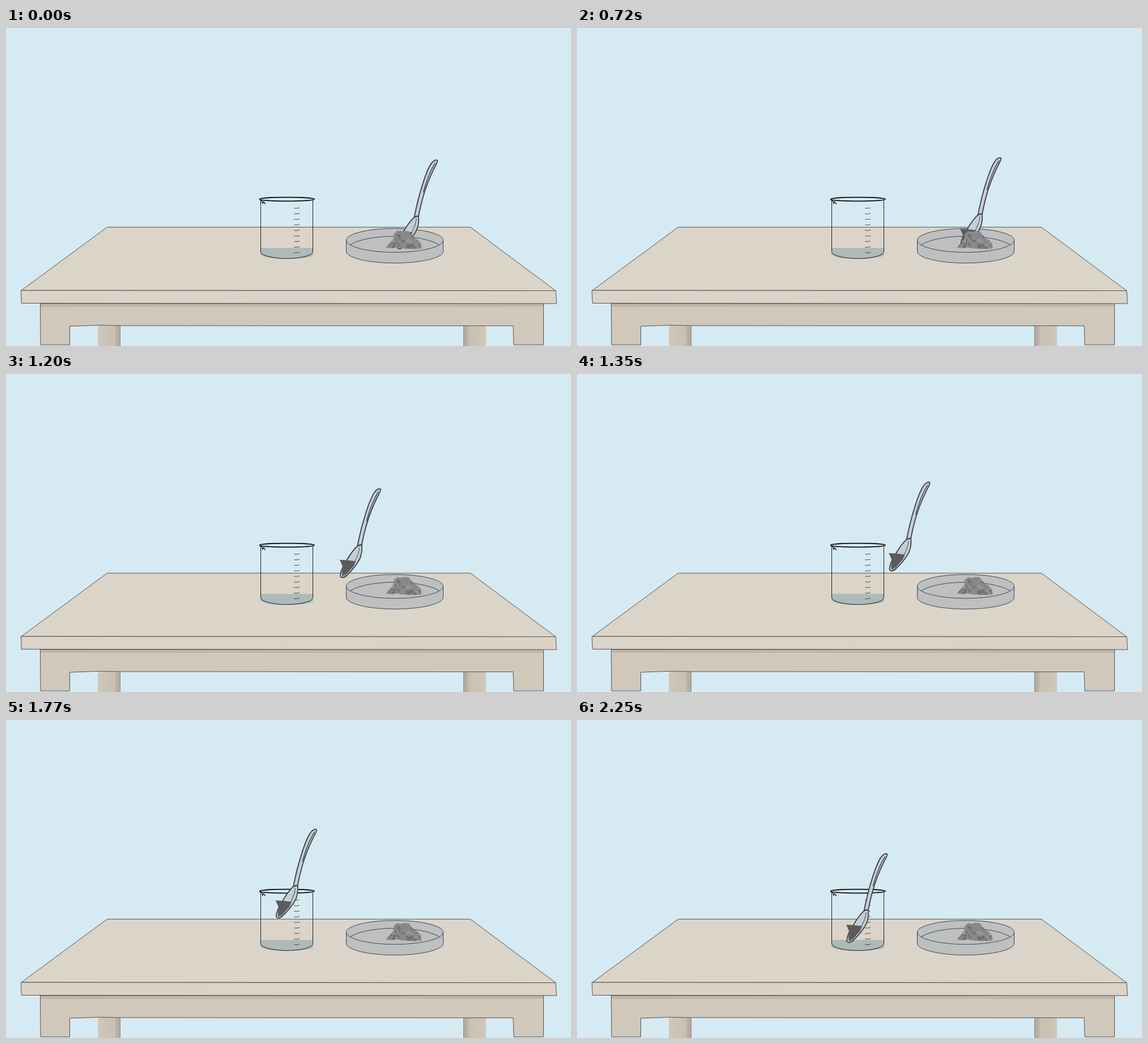
An HTML page with a canvas that plays this animation: 997x561 px, repeating every 2.73 s.

```html
<!DOCTYPE html>
<html lang="en">
<head>
<meta charset="utf-8">
<title>Spoon and beaker</title>
<style>
html, body { margin: 0; width: 100%; height: 100%; overflow: hidden; background: #d6eaf3; }
canvas { display: block; }
</style>
</head>
<body>
<canvas id="stage" width="997" height="561"></canvas>
<script>
const ctx = document.getElementById('stage').getContext('2d');
const LOOP = 2730, HOLD = 480, STEP = 30, STEPS = 60;

function paint(path, fill, stroke, width = 1) {
  if (fill) {
    ctx.fillStyle = fill;
    ctx.fill(path);
  }
  if (stroke) {
    ctx.strokeStyle = stroke;
    ctx.lineWidth = width;
    ctx.stroke(path);
  }
}

function shape(d, fill, stroke, width) {
  paint(new Path2D(d), fill, stroke, width);
}

function rect(x, y, w, h, fill) {
  ctx.fillStyle = fill;
  ctx.fillRect(x, y, w, h);
}

function randomFrom(seed) {
  return () => (seed = (seed * 16807) % 2147483647) / 2147483647;
}

function drawLeg(x, mirrored) {
  const g = ctx.createLinearGradient(x, 0, x + 40, 0);
  const tones = ['#d1c8bb', '#cec5b9', '#c9c0b4', '#bab0a5', '#b3a99f'];
  [0, 0.15, 0.74, 0.82, 1].forEach((p, i) =>
    g.addColorStop(mirrored ? 1 - p : p, tones[i]));
  rect(x, 524, 40, 37, g);
  rect(mirrored ? x : x + 39, 524, 1, 37, '#8d867e');
}

function drawTable() {
  const line = '#56524e';
  drawLeg(162, false);
  drawLeg(807, true);
  const apron = 'M60.5 486H948.5V559H896L895 525.4L202 525L163 524.3L112.5 526.2V559H61Z';
  shape(apron, '#d1c8bc');
  rect(61, 486, 887, 6, '#c0b6ab');
  shape(apron, null, line);
  shape('M178.5 351.3H819.5L970 463.5L27 462.9Z', '#dbd4c8', line);
  shape('M26.4 462.9L970 463.5L971.5 486.2L27.3 485.5Z', '#dbd3c8', line);
}

function drawBeaker() {
  shape('M449 388H541.5V402L535 404Q520 407 495 407Q466 407 453 402.5L449 400Z', '#aeb9b9');
  shape('M449.5 305V394.5A46 12.2 0 0 0 541.5 394.5V304', null, '#1c1c1c', 1);
  const rim = new Path2D();
  rim.ellipse(495.8, 302, 48.4, 3.4, 0, 0, 7);
  paint(rim, null, '#0c0c0c', 1.6);
  shape('M447.5 303L452 305.5L452.7 309.3L454.8 306.3L457.7 310.7', null, '#0c0c0c', 1.3);
  for (let i = 0; i < 9; i++) {
    const y = 317.9 + i * 9.8;
    shape(`M508.3 ${y}Q513 ${y + 0.8} 518 ${y - 0.8}`, null, '#3b3d3e', 0.9);
  }
}

function drawDish() {
  const line = '#2d4c5e';
  shape('M600.5 374.3A85.5 20.7 0 0 1 771.5 374.3V394A85.5 20.7 0 0 1 600.5 394Z', '#bfbfc0', line);
  shape('M600.5 374.3A85.5 21.5 0 0 0 771.5 374.3', null, line);
  shape('M607.5 382.3C640 362.4 731 362.4 764.5 382.3', null, line);
}

const pile = new Path2D('M670.5 387.5L677 380L683 373L684.5 363L690 358.5L697 359.5L703 358L711 358.5' +
  'L714.5 364L719 369L727 374.5L732.5 380L733.5 389L715 390L700 389L689 387L680 388.5Z');
const rand = randomFrom(41);
const specks = Array.from({ length: 40 }, () => ({
  x: 674 + rand() * 58,
  y: 359 + rand() * 30,
  rx: 1.4 + rand() * 2.8,
  ry: 1 + rand() * 1.8,
  turn: rand() * 3,
  tone: rand() < 0.6 ? '#6f6f6f' : '#979797'
}));

function drawPile() {
  paint(pile, '#888888');
  ctx.save();
  ctx.clip(pile);
  for (const s of specks) {
    const blob = new Path2D();
    blob.ellipse(s.x, s.y, s.rx, s.ry, s.turn, 0, 7);
    paint(blob, s.tone);
  }
  ctx.restore();
}

function drawSpoon(dx, dy) {
  const ink = '#3a4045';
  ctx.save();
  ctx.translate(dx, dy + 0.6);
  ctx.lineJoin = ctx.lineCap = 'round';
  // bowl
  shape('M720.5 333C713 340 707 349 702 357.5C696 367 691 376 690.3 384' +
    'C690 389.5 695 390.5 700 386.5C708 379 719 367 725 355C728 347 728.8 340 728 331Z',
    '#c5ced6', ink, 1.8);
  shape('M724 336C723.5 346 719 356 711 369C706 377 701 383 696 387', null, '#596168', 1.2);
  // handle
  shape('M720.5 333C724 315 729 294 735.5 274C740 260 745 246 750.5 238.5' +
    'C754 233 759.5 231 761.3 233C762.3 235 758.5 241 755 248' +
    'C747.5 263 740.5 281 735.5 299C731.5 313 729.5 324 728 331Q724 331 720.5 333Z',
    '#c5d0d6', ink, 1.8);
  shape('M757.5 237.5C750 249 742 269 736.5 289', null, ink, 1.4);
  // scooped powder
  shape('M689 357.5L702 358.3L717.5 360L713.5 369L703 380L693.5 387L693 379L695 371Z', '#5b5b5b');
  ctx.restore();
}

// Even acceleration, steady middle, even braking
function ease(u) {
  const a = 0.4, speed = 1 / (1 - a);
  if (u < a) return speed * u * u / (2 * a);
  if (u > 1 - a) return 1 - ease(1 - u);
  return speed * (u - a / 2);
}

// Diagonal lift towards the beaker, then straight down into it
function spoonOffset(u) {
  const apex = [-213, -64.5], end = [-214, 3];
  const lift = Math.hypot(...apex);
  const drop = Math.hypot(end[0] - apex[0], end[1] - apex[1]);
  const d = ease(u) * (lift + drop);
  if (d < lift) return apex.map(v => v * d / lift);
  return apex.map((v, i) => v + (end[i] - v) * (d - lift) / drop);
}

function draw(now) {
  const t = now % LOOP;
  const step = Math.floor((t - HOLD) / STEP) + 1;
  const u = Math.min(Math.max(step / STEPS, 0), 1);
  rect(0, 0, 997, 561, '#d6eaf3');
  drawTable();
  drawBeaker();
  drawDish();
  drawSpoon(...spoonOffset(u));
  drawPile();
}

function tick() {
  draw(performance.now());
  requestAnimationFrame(tick);
}
tick();
</script>
</body>
</html>
```
